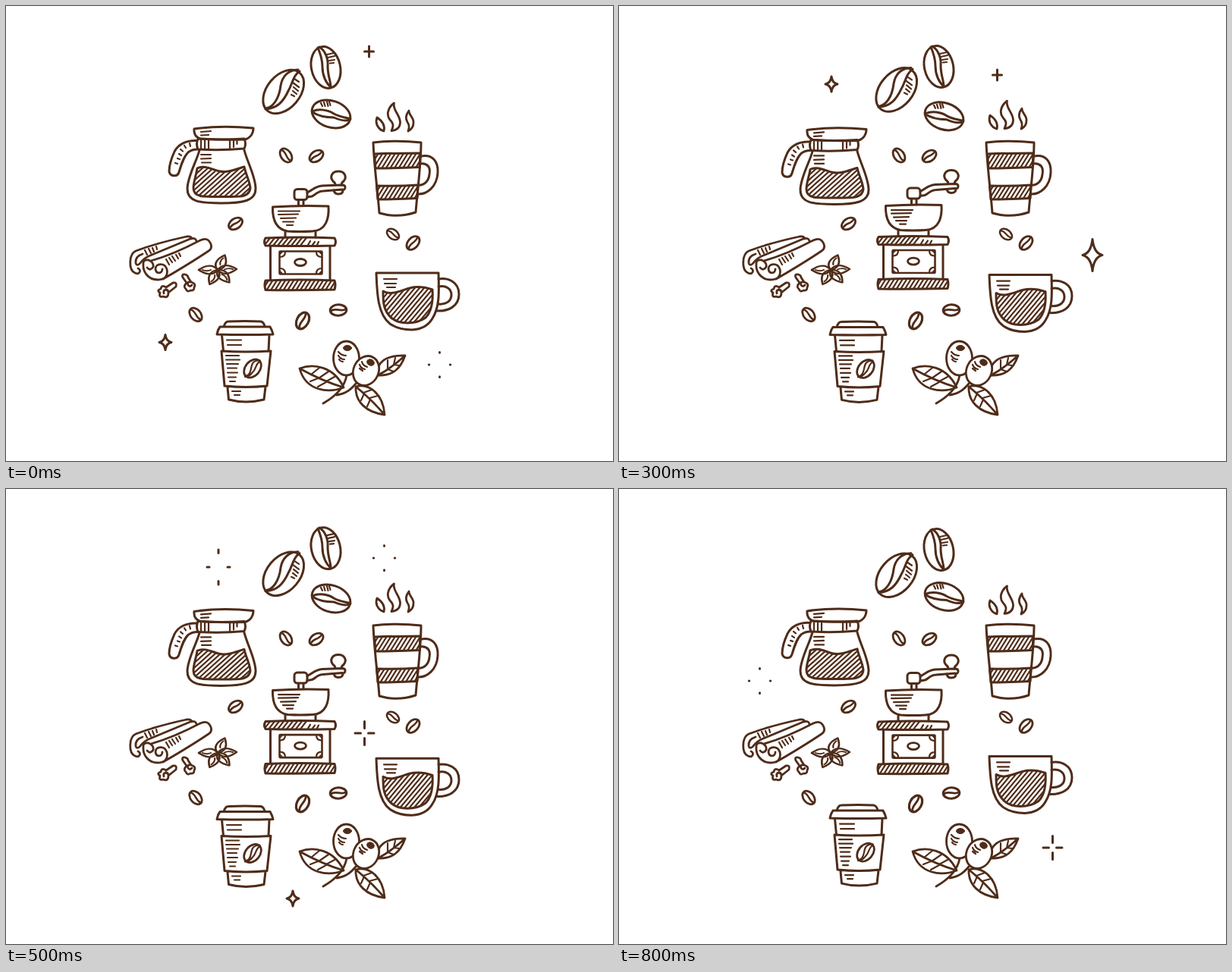
These frames come from a looping animation (800x600 px, 900 ms). An HTML page:

```html
<!DOCTYPE html>
<html lang="en">
<head>
<meta charset="utf-8">
<title>Coffee icons</title>
<style>
  html, body { margin: 0; width: 100%; height: 100%; overflow: hidden; background: #fff; }
  svg { display: block; width: 100%; height: 100%; fill: none; stroke: #4f2c19; stroke-width: 3; stroke-linecap: round; stroke-linejoin: round; }
  .thin { stroke-width: 2.2; }
  .white { fill: #fff; }
  .dark { fill: #4f2c19; stroke-width: 1; }
</style>
</head>
<body>
<svg viewBox="0 0 800 600">
  <defs>
    <g id="bean">
      <ellipse rx="10" ry="6.7" stroke-width="2.8"/>
      <path d="M-9.500 1C-4-4 3 3 9.500-1" stroke-width="2.5"/>
    </g>
    <g id="petal">
      <path d="M0 0C6-9 15-8 25 0C15 8 6 9 0 0Z" stroke-width="2.7"/>
      <path class="thin" d="M9 0Q14-3 20 0"/>
    </g>
  </defs>

  <!-- large beans -->
  <g data-peak="7.5">
    <ellipse rx="32.800" ry="21.800" transform="translate(365.7 113) rotate(-50)"/>
    <path d="M385 84C372 84 364 93 362 105C360 122 352 134 342 135M387 86C378 92 378 102 372 112C365 127 357 135 342 136"/>
    <path class="thin" d="M380 96L386 100M378 101L386 107M379 107L385 112M378 112L383 116M376 117L380 119"/>
  </g>
  <g data-peak="1">
    <ellipse rx="27.800" ry="19" transform="translate(421.5 81) rotate(77)"/>
    <path d="M411 55C414 62 417 71 417 80C417 92 422 102 428 107M413 54C421 59 425 70 424 80C424 92 428 99 428 107"/>
    <path class="thin" d="M423 64L432 62M424 68L433 66M426 72L433 71M427 75.500L432 75"/>
  </g>
  <g data-peak="3.4">
    <ellipse rx="26" ry="17.500" transform="translate(428.5 142.5) rotate(18)"/>
    <path d="M404 139C412 135 425 137 432 142C441 147 450 147 454 149M404 140C413 146 424 147 432 147C441 151 448 152 453 150"/>
    <path class="thin" d="M415 128L417 132M419 127L420.500 132M423 126L424.500 132M426 126L427.500 131"/>
  </g>

  <g id="smallBeans"></g>

  <!-- carafe -->
  <g data-peak="2.25">
    <path d="M248 162C272 158.500 300 158.500 326 161C326 168 322 174 315 176Q285 177 256 175Q247 172 248 162Z"/>
    <path d="M253 175Q285 177 314 175Q317 182 314 188Q283 191 253 189Q250 182 253 175Z"/>
    <path class="thin" d="M257 177V188M262 177V189M267 177V189M295 177V189M300 178V186M304.500 178V182M257 166L270 165M257 170.500L267 170M257 196H270M257 201.500L270 201M258 206.500H270"/>
    <path d="M251 177.500C238 177 227 182 222 192C217 203 215 211 215 218C216 225 226 226 228 219C231 209 234 199 240 193Q245 189 252 189"/>
    <path class="thin" d="M242 181L243 185M235 184L237 187M230 189L233 191.500M228 195L231 197M226 201L229 202M223 207L226 208"/>
    <path d="M255 190C252 203 239 225 239 241C239 258 255 260 284 260C312 260 329 257 329 241C329 225 318 206 314 190"/>
    <path data-hatch="42" d="M252 214C262 209 272 216 282 218C292 220 301 216 314 212C316 222 321 230 322 240Q321 250 308 251Q284 252 260 251Q247 250 247 240C247 232 251 222 252 214Z"/>
  </g>

  <!-- tall mug -->
  <g data-peak="8.6" stroke-width="2.8">
    <path d="M511.500 128C509 137 520 144 519.500 154C519 161 514 164 508 164.500C511 158 511 155 506 150C501 144 503 134 511.500 128Z"/>
    <path d="M489 147C495 151 500 157 498 165C494 164 491 161 489 157Q487 152 489 147Z"/>
    <path d="M531 138C531 144 538 148 537 154C537 160 534 163 530 165C532 160 532 157 529 153C526 148 528 142 531 138Z"/>
  </g>
  <path d="M484 180Q515 176.500 547 180C547 210 542 245 540 272Q516 280 492 273C490 245 485 210 484 180Z"/>
  <path data-hatch="58" d="M485.500 195Q515 194 546 194L545 212.500Q516 214 487 214Z"/>
  <path data-hatch="58" d="M488.500 237Q516 238 543 236L542 253.500Q516 255 490 255Z"/>
  <path d="M547 198C562 195 570 205 569 220C568 238 555 249 542 248M546 208C555 207 560 212 558 222C557 232 550 237 543 236"/>

  <!-- grinder -->
  <g data-peak="6.75">
    <path d="M434 236Q434 233 431 231C426 225 430 218 438 218C446 218 450 225 445 231Q442 233 442 236M432 243Q433 248 438 248Q444 248 444 243"/>
    <path d="M397 246C405 242 407 238 417 237L443 236Q447 236 447 239Q447 243 443 242L418 244C410 244 407 250 403 251L397 252"/>
    <rect x="380" y="241.500" width="17" height="14" rx="4"/>
    <path d="M385.500 256V263M392 256V263"/>
    <path d="M351.500 265Q388 262.500 425 264C426 280 422 296 404 297Q388 298 371 297C355 294 351 280 351.500 265Z"/>
    <path class="thin" d="M359 270.500H387M359 275L385 274.500M362 280L382 279.500M365 284.500H379M370 289H378"/>
    <path d="M368 298V305M408 298V305M348.500 317V361M427 317V361"/>
    <path d="M342 306Q388 304 433 306Q436 311 433 316Q388 317 342 316Q339 311 342 306Z"/>
    <path data-hatch="52" stroke="none" d="M342 306H399L392 316H342Z"/>
    <path class="thin" d="M398 315L401 310M404 315L407 311M410 315L412 311"/>
    <path data-hatch="58" d="M342 362Q388 360 433 362Q435 368 433 374Q388 375 342 374.500Q340 368 342 362Z"/>
    <rect x="360.500" y="323.500" width="56" height="30" rx="1" stroke-width="2.6"/>
    <path class="thin" d="M361 331Q368 331 368 324M409 324Q409 331 416 331M361 346Q368 346 368 353M409 353Q409 346 416 346"/>
    <path class="dark" d="M361 328L365 324H361ZM416 328L412 324H416ZM361 349L365 353H361ZM416 349L412 353H416Z"/>
    <ellipse cx="388" cy="338" rx="7.500" ry="4.500" stroke-width="2.800"/>
  </g>

  <!-- spices -->
  <g stroke-width="2.800">
    <path d="M170 352C161 348 162 327 171 323C192 315 215 309 238 304Q244 303 245 307M180 327Q170 330 171 339Q172 343 176 340Q182 332 190 329L243 307Q250 305 251 310M170 352C176 355 179 348 174 346"/>
    <path d="M181 340C180 350 187 361 200 361C209 361 214 356 212 347C209 338 197 339 197 347C198 354 206 353 206 347M181 341Q180 334 188 335Q195 338 194 344Q190 350 186 345M191 336Q220 328 256 309Q266 304 270 314Q272 320 267 323Q240 341 207 360"/>
    <path class="thin" d="M183 322L186 328M188 320L191 326M193 319L195 324M198 317L199 321M211 334L215 341M215 332L219 338M219 330L223 336M224 328L227 333M228 326L230 330"/>
    <path d="M211 371L220 365Q226 364 224 370L214 378M211 371Q205 367 204 373Q198 375 203 378Q201 385 207 383Q214 386 214 378Q214 374 210 374Q207 375 208 379"/>
    <path d="M238 365L233 358Q231 353 236 354Q240 355 240 358L244 364M238 365Q233 370 237 373Q239 378 243 375Q248 376 248 371Q251 366 244 364Q238 363 240 368Q242 371 245 368"/>
    <g id="anise" transform="translate(279 348) scale(1 .84)"></g>
  </g>

  <!-- glass cup -->
  <g data-peak="4.5">
    <path d="M488 352H570C571 380 571 398 562 412Q554 426 535 427Q517 427 506 419C489 406 489 375 488 352Z"/>
    <path data-hatch="50" d="M497 376C507 382 518 376 532 372C543 369 553 371 562 374C563 390 561 403 553 411Q543 418 529 418Q512 418 504 407C497 398 497 388 497 376Z"/>
    <path class="thin" d="M498 360H515M499 366H514M502 371H513"/>
    <path d="M570 360C583 358 597 364 597 380C597 396 583 403 567 402M570 370C580 368 587 373 587 381C587 389 580 394 570 393"/>
  </g>

  <!-- paper cup -->
  <g data-peak="5.8">
    <path d="M287 423Q289 416 293 416Q315 415 336 416Q340 417 341 423M282 423H348Q351 428 352 433Q315 434 278 433Q279 427 282 423Z"/>
    <path d="M284.500 434L286.500 455M347 434L346 455M284 455Q316 457 349 455L344 501Q316 504 288 501ZM292 503L293.500 519Q316 525 340 519L342 502"/>
    <path class="thin" d="M291 440.500H310M292 447H310M290 461H307M290 466.500H308M291 472H306M292 477.500H304M292 483.500H305M293 489.500H303M295 495H302M298 508H309M301 513H308"/>
    <ellipse rx="13.500" ry="9.500" transform="translate(325 478) rotate(-50)" stroke-width="2.800"/>
    <path class="thin" d="M334 467C325 468 324 472 323 478C322 484 319 488 315 488M335 468C328 473 330 479 325 483C322 487 319 489 315 489"/>
  </g>

  <!-- berry branch -->
  <g stroke-width="2.800">
    <path d="M418 524C432 516 446 505 449 487M436 513C449 511 455 505 461 498"/>
    <path d="M387 478C405 471 432 475 445 503C425 511 395 508 387 478ZM387 478C405 488 425 497 445 503"/>
    <path class="thin" d="M402 486L413 477M412 491L425 482M422 495L433 489M411 491L401 495M422 496L411 502"/>
    <path d="M489 488C488 470 500 460 526 461C520 478 510 488 490 487Q507 478 526 461"/>
    <path class="thin" d="M503 479L503 467M511 473L513 464M503 479L511 482M511 473L518 474"/>
    <path d="M461 502C477 497 497 510 499 539C475 536 460 522 461 502Q481 518 499 539"/>
    <path class="thin" d="M471 510L482 506M479 517L490 514M472 511L468 520M480 519L476 528"/>
    <ellipse class="white" cx="448.500" cy="464.500" rx="17" ry="22.500"/>
    <ellipse class="white" rx="16.500" ry="20" transform="translate(474.500 481) rotate(25)"/>
    <ellipse class="dark" cx="450" cy="451" rx="5.500" ry="3.500"/>
    <ellipse class="dark" rx="5" ry="4" transform="translate(480.500 470) rotate(25)"/>
    <path class="thin" d="M438 456Q442 461 448 461M438 461Q441 466 446 466M439 466Q441 469 444 469M469 469Q470 474 476 476M466 473Q468 478 473 479M466 478L470 481"/>
  </g>

  <g id="sparkles"></g>
</svg>
<script>
const STEP = 100, STEPS = 9, AMPLITUDE = 1.7, HATCH_GAP = 4.7;
const byId = id => document.getElementById(id);
const movers = [...document.querySelectorAll('[data-peak]')];

// Fills a shape with parallel strokes rising to the right at its data-hatch angle.
function hatch(shape, index) {
  const { x, y, width, height } = shape.getBBox();
  const angle = shape.dataset.hatch * Math.PI / 180;
  const run = height / Math.tan(angle);
  let lines = '';
  for (let left = x - run; left < x + width; left += HATCH_GAP / Math.sin(angle)) {
    lines += `M${left} ${y + height}l${run} ${-height}`;
  }
  shape.insertAdjacentHTML('beforebegin',
    `<clipPath id="clip${index}"><path d="${shape.getAttribute('d')}"/></clipPath>` +
    `<path class="thin" clip-path="url(#clip${index})" d="${lines}"/>`);
}
document.querySelectorAll('[data-hatch]').forEach(hatch);

// x, y, angle, scale
const smallBeans = [
  [369, 197, 55, 1], [409, 198, -35, 1], [302.5, 287, -35, 1], [510, 301, 38, .9],
  [536.5, 312.5, -48, 1.02], [250, 407, 50, 1], [391, 415, -62, 1.15], [438, 401, -2, 1.08]
];
byId('smallBeans').innerHTML = smallBeans.map(([x, y, angle, size]) =>
  `<use href="#bean" transform="translate(${x} ${y}) rotate(${angle}) scale(${size})"/>`).join('');
byId('anise').innerHTML = [-68, -3, 52, 115, 180].map(angle =>
  `<use href="#petal" transform="rotate(${angle})"/>`).join('');

// Four arms, each running from the inner to the outer radius.
const rays = (x0, x1, y0, y1) =>
  `M${x0} 0H${x1}M${-x0} 0H${-x1}M0 ${y0}V${y1}M0 ${-y0}V${-y1}`;

const star = (w, h) => {
  const a = w * .14, b = h * .13;
  return `M0 ${-h}Q${a} ${-b} ${w} 0Q${a} ${b} 0 ${h}Q${-a} ${b} ${-w} 0Q${-a} ${-b} 0 ${-h}Z`;
};

const plusStages = [rays(0, 6, 0, 7), rays(5, 12.5, 6.5, 15.5), rays(13.8, 14.2, 15.8, 16.6)];
const starStages = [star(8, 10), star(13, 21), rays(12, 15, 18.5, 23)];

// x, y, first step, stages
const sparkles = [
  [478.5, 60, 0, plusStages], [498.5, 91, 3, plusStages], [472.5, 322, 4, plusStages],
  [185.5, 253, 6, plusStages], [571.5, 473, 7, plusStages],
  [210, 443.5, 0, starStages], [624, 328.5, 2, starStages],
  [280, 103, 3, starStages], [378, 540, 5, starStages]
];

const wave = angle => Math.cos(2 * Math.PI * angle / STEPS);

function draw(now) {
  const step = Math.floor(now / STEP) % STEPS;
  for (const part of movers) {
    const peak = +part.dataset.peak;
    const dy = AMPLITUDE * (wave(step - peak) - wave(peak));
    part.setAttribute('transform', `translate(0 ${dy.toFixed(2)})`);
  }
  byId('sparkles').innerHTML = sparkles.map(([x, y, first, stages]) => {
    const shape = stages[(step - first + STEPS) % STEPS];
    return shape ? `<path transform="translate(${x} ${y})" d="${shape}"/>` : '';
  }).join('');
}

const start = performance.now();
function tick() {
  draw(performance.now() - start);
  requestAnimationFrame(tick);
}
tick();
</script>
</body>
</html>
```
